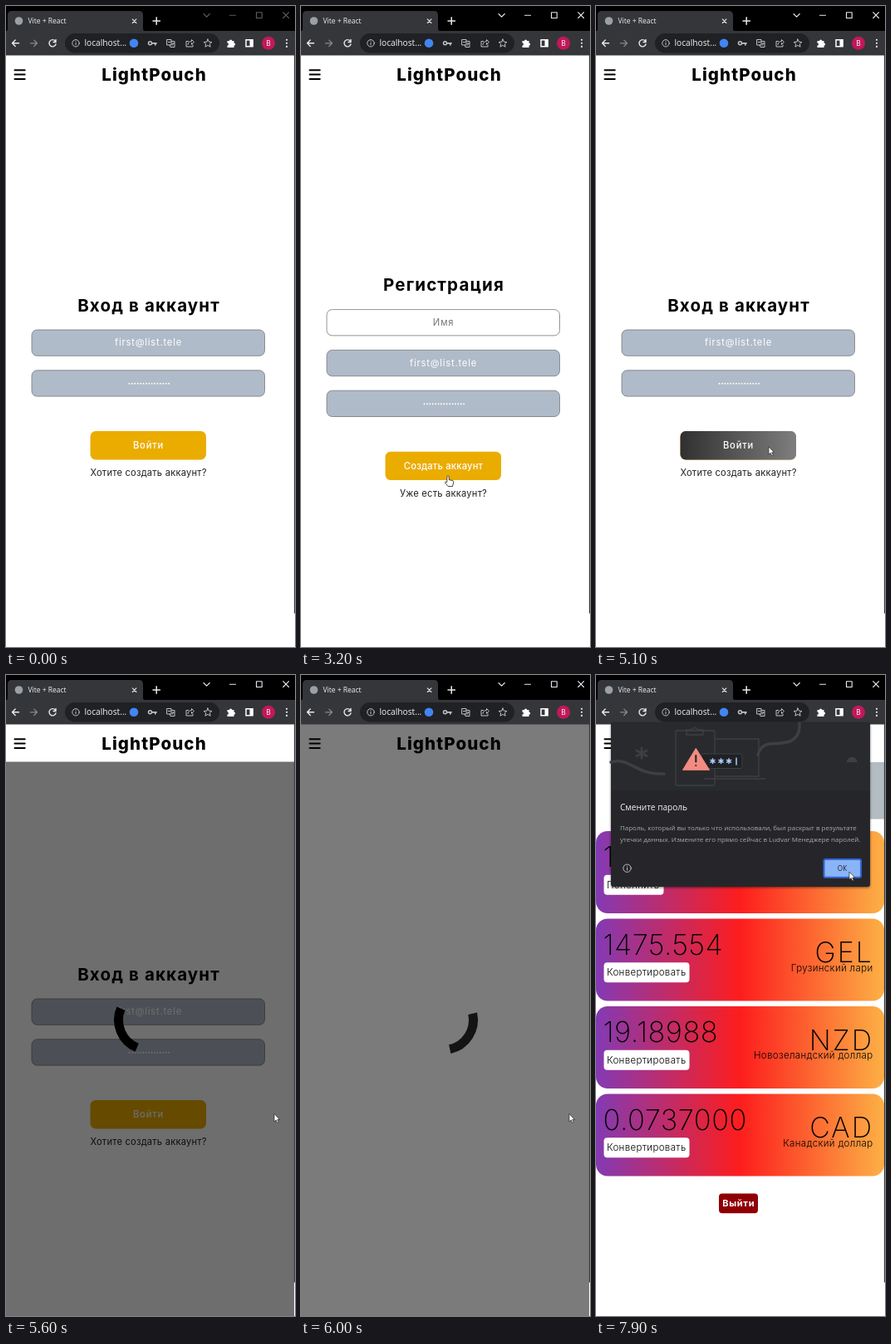
Animation of 348x772 px, one loop 8000 ms. Source, as an HTML page:

```html
<!DOCTYPE html>
<html lang="ru">
<head>
<meta charset="utf-8">
<title>Вход</title>
<style>
html, body { margin: 0; width: 100%; height: 100%; overflow: hidden; background: #fff; }
svg { display: block; width: 348px; height: 772px; }
text { font: 400 11.2px Inter, sans-serif; letter-spacing: .2px; }
.mid { text-anchor: middle; }
.end { text-anchor: end; }
.head { font-size: 20.5px; font-weight: 700; letter-spacing: 1.15px; }
.logo { font-size: 20.5px; font-weight: 800; letter-spacing: 1.1px; }
.btn { font-weight: 500; fill: #fff; }
.sum { font-size: 34.5px; font-weight: 200; letter-spacing: .5px; }
.code { font-size: 34px; font-weight: 200; letter-spacing: 2px; }
.small { font-size: 11.5px; font-weight: 300; letter-spacing: .35px; }
.ui { font-family: "Open Sans", "Noto Sans", sans-serif; letter-spacing: 0; }
.line { fill: none; stroke-linecap: round; stroke-linejoin: round; }
</style>
</head>
<body>
<svg viewBox="0 0 348 772" xmlns="http://www.w3.org/2000/svg">
  <defs>
    <linearGradient id="cardFill">
      <stop offset="0" stop-color="#833ab4"/><stop offset=".5" stop-color="#fd1d1d"/><stop offset="1" stop-color="#fcb045"/>
    </linearGradient>
    <linearGradient id="hoverFill">
      <stop offset="0" stop-color="#303030"/><stop offset="1" stop-color="#7e7e7e"/>
    </linearGradient>
    <filter id="shade" x="-10%" y="-10%" width="120%" height="120%">
      <feDropShadow dx="0" dy="1" stdDeviation="1.500" flood-opacity=".55"/>
    </filter>
  </defs>
  <rect width="348" height="772" fill="#fff"/>

  <g id="login"></g>
  <g id="signup"></g>
  <g id="wallet"></g>

  <g id="veil">
    <rect x="0" y="59" width="347" height="713" id="veilRect"/>
    <path id="arc" class="line" style="stroke-linecap:butt" stroke-width="11" d="M36 0A36 36 0 0 1 0 36"/>
  </g>

  <g id="header">
    <rect id="headerBg" y="59" width="347" height="45.500" fill="#fff"/>
    <path d="M10.500 77.300h12.200M10.500 82.600h12.200M10.500 87.900h12.200" stroke="#000" stroke-width="2" class="line"/>
    <text class="logo mid" x="178.500" y="89.500">LightPouch</text>
  </g>
  <rect x="346.900" y="59" width="1.100" height="672.500" fill="#3c3c3c"/>

  <g id="chrome">
    <rect width="348" height="31" fill="#000"/>
    <path d="M0 31q2-1 2-4V11q0-5 5-5H160q5 0 5 5V27q0 3 3 4z" fill="#35363a"/>
    <rect y="30" width="348" height="29.500" fill="#35363a"/>
    <circle cx="15.500" cy="18" r="4.800" fill="#9aa0a6"/>
    <text class="ui" x="26.500" y="21.200" style="font-size:8.500px" fill="#f1f3f4">Vite + React</text>
    <g class="line" stroke="#e8eaed" stroke-width="1.100">
      <path d="M152.300 15.900l4.600 4.600m0-4.600l-4.600 4.600"/>
      <path d="M177 18h8.400M181.200 13.800v8.400" stroke-width="1.500"/>
      <g id="controls"><path d="M238 9.500l3.600 3.600 3.600-3.600M269.500 11.200h7M301.500 7.800h6.700v6.700h-6.700zM333.700 7.700l6.800 6.800m0-6.800l-6.800 6.800"/></g>
      <path d="M15.500 44.800H7.500m3.700-3.700l-3.700 3.700 3.700 3.700" stroke-width="1.400"/>
      <path d="M29.500 44.800h8m-3.700-3.700l3.700 3.700-3.700 3.700" stroke="#85888c" stroke-width="1.300"/>
      <path d="M59.300 42.200a4.100 4.100 0 1 0 .7 3.800M60 40.500v3h-3" stroke-width="1.400"/>
    </g>
    <rect x="71" y="33" width="186" height="23.500" rx="11.750" fill="#202124"/>
    <g class="line" stroke="#bdc1c6" stroke-width="1">
      <circle cx="84" cy="44.800" r="4.200"/><path d="M84 44.300v2.500M84 42.500v.1"/>
      <circle cx="173.500" cy="44.800" r="2" stroke-width="1.500"/><path d="M175.800 44.800h5.200m-1.200 0v2" stroke-width="1.700"/>
      <path d="M194 40.500h5v6.500h-5zM199 42.500h4v7h-5l-1-2.500M195.300 43.500h2.400M200 45h2M200 47.500l2-2.500"/>
      <path d="M219.500 42.500h-2.500v6.500h8v-2M219 46.500q.5-4 4.500-4v-2l3 3-3 3v-2"/>
      <path d="M243 40l1.400 3.200 3.500.3-2.600 2.300.8 3.400-3.100-1.800-3.100 1.800.8-3.400-2.600-2.300 3.500-.3z"/>
    </g>
    <text class="ui" x="94.500" y="48.400" style="font-size:10.200px" fill="#f1f3f4">localhost...</text>
    <circle cx="154" cy="44.800" r="5.300" fill="#4285f4"/>
    <path d="M266.500 42h2.500a1.600 1.600 0 0 1 3.200 0h2.300v2.500a1.600 1.600 0 0 1 0 3.200V50h-8v-2.500a1.500 1.500 0 0 0 0-3z" fill="#fff"/>
    <path d="M289 40.800h8v8h-8z" fill="none" stroke="#fff" stroke-width="1.500"/><path d="M293.500 40.500h4v8.500h-4z" fill="#fff"/>
    <circle cx="316" cy="44.800" r="8" fill="#c2185b"/>
    <text class="ui mid" x="316" y="47.900" style="font-size:8.500px" fill="#fff">B</text>
    <path class="line" d="M338 40.700v.01M338 44.800v.01M338 48.900v.01" stroke="#fff" stroke-width="2.100"/>
  </g>

  <g id="popup">
    <rect x="18" y="57" width="312" height="198" rx="3" fill="#25262a" filter="url(#shade)"/>
    <rect x="18" y="57" width="312" height="82" fill="#292a2d"/>
    <g class="line" stroke="#3c4043">
      <path d="M18 105C40 98 48 121 82 119M195 96C200 77 215 86 233 80Q246 75 245 58" stroke-width="3.500"/>
      <path d="M55 87.500v13M49 91l12 6.500M61 91l-12 6.500" stroke-width="2.700"/>
      <path d="M143 76V69q0-2-2-2H98q-2 0-2 2v62q0 2 2 2h43q2 0 2-2V77H196v45H143M130 125H204M109 72V66h6q4-5 8 0h6v6z" stroke-width="1.300"/>
    </g>
    <path d="M302 105a6 6 0 0 1 12.500 0z" fill="#3c4043"/>
    <rect x="127" y="95" width="49" height="17.500" rx="2" fill="#202124" stroke="#3c4043"/>
    <g class="line" stroke="#aecbfa" stroke-width="1.500" id="stars"><path d="M169 100v8"/></g>
    <path d="M120.300 88.300L136.500 114.300H104.500z" fill="#f28b82" stroke="#f28b82" stroke-linejoin="round"/>
    <path class="line" d="M120.300 97v7.500M120.300 109v.1" stroke="#202124" stroke-width="2"/>
    <text class="ui" x="29" y="162.500" style="font-size:10.100px" fill="#f1f3f4">Смените пароль</text>
    <g fill="#a6abb0">
      <text class="ui" x="29" y="186.700" style="font-size:7.980px">Пароль, который вы только что использовали, был раскрыт в результате</text>
      <text class="ui" x="29" y="200.700" style="font-size:7.980px">утечки данных. Измените его прямо сейчас в Ludvar Менеджере паролей.</text>
    </g>
    <g class="line" stroke="#bdc1c6" stroke-width="1"><circle cx="37.500" cy="232.700" r="4.700"/><path d="M37.500 232.200v2.800M37.500 230.300v.1"/></g>
    <rect x="274.500" y="222" width="44.500" height="21.800" rx="2" fill="#8ab4f8" stroke="#3367d6" stroke-width="2"/>
    <text class="ui mid" x="296.500" y="235.800" style="font-size:8.200px" fill="#202124">ОК</text>
  </g>

  <path id="arrow" d="M0 0V9.500L2.200 7.500 3.700 11 5.300 10.300 3.800 7H6.600z" fill="#fff" stroke="#222" stroke-width=".7"/>
  <path id="hand" d="M-1.200 1.200Q0-.8 1.200 1.200V5l4.800 1.200Q7 6.800 6.600 8.500L5.500 13H0L-3.500 8.500Q-3.600 6.800-1.200 8z" fill="#fff" stroke="#222" stroke-width=".8"/>
</svg>
<script>
const $ = id => document.getElementById(id);
const LOOP = 8000;

const label = (cls, x, y, str, extra = '') => `<text class="${cls}" x="${x}" y="${y}" ${extra}>${str}</text>`;
const box = (x, y, w, h, r, extra) => `<rect x="${x}" y="${y}" width="${w}" height="${h}" rx="${r}" ${extra}/>`;

function field(y, content, filled = true) {
  return box(31, y, 280.5, 31.3, 6.5, `fill="${filled ? '#b0bbc9' : '#fff'}" stroke="#77787c" stroke-width=".8"`) + content;
}
const email = y => field(y, label('mid', 171.5, y + 19.4, 'first@list.tele', 'fill="#fff" style="letter-spacing:.8px"'));
const password = y => field(y, `<path class="line" d="M148.500 ${y + 16}h47.700" stroke="#fff" stroke-width="1.900" stroke-dasharray="0 3.400"/>`);

function form(title, shift, fields, action, spacing, link) {
  const y = 512 + shift;
  return label('head mid', 172, 367.5 - shift, title) + fields +
    box(101.5, y, 139.5, 34.4, 6.5, 'fill="#ebac00"') +
    box(101.5, y, 139.5, 34.4, 6.5, 'class="hover" fill="url(#hoverFill)" opacity="0"') +
    label('btn mid', 171.5, y + 21.3, action, `style="letter-spacing:${spacing}px"`) +
    label('mid', 171.5, y + 54, link, 'fill="#222"');
}

$('login').innerHTML = form('Вход в аккаунт', 0, email(390) + password(438.8),
  'Войти', 0.8, 'Хотите создать аккаунт?');
$('signup').innerHTML = form('Регистрация', 24.7,
  field(365.6, label('mid', 171.5, 385, 'Имя', 'fill="#777" style="letter-spacing:.8px"'), false) + email(414.4) + password(463.2),
  'Создать аккаунт', 0.2, 'Уже есть аккаунт?');

const cards = [
  ['1', '', '', 'Пополнить', 72],
  ['1475.554', 'GEL', 'Грузинский лари', 'Конвертировать', 103],
  ['19.18988', 'NZD', 'Новозеландский доллар', 'Конвертировать', 103],
  ['0.0737000', 'CAD', 'Канадский доллар', 'Конвертировать', 103]
];
$('wallet').innerHTML = box(40, 105, 307, 68.5, 0, 'fill="#b3bcc3"') +
  cards.map(([sum, code, name, action, w], i) => {
    const y = 188 + i * 105.5;
    return box(0, y, 347, 99, 14, 'fill="url(#cardFill)"') +
      label('sum', 8.5, y + 43.3, sum) + label('code end', 334, y + 52.5, code) +
      label('small end', 333.5, y + 63.3, name) +
      box(9.5, y + 52.8, w, 24, 4, 'fill="#fff"') + label('small', 13, y + 68.6, action);
  }).join('') +
  box(148, 624.5, 47, 23.8, 4, 'fill="#8f0006"') +
  label('mid', 171.8, 640.3, 'Выйти', 'fill="#fff" style="font-weight:700;font-size:11px;letter-spacing:.7px"');

$('stars').innerHTML += [140.5, 150.5, 160].map(x =>
  `<path d="M${x} 100.800v5.800M${x - 2.5} 102.300l5 2.800M${x + 2.5} 102.300l-5 2.800"/>`).join('');

// Cursor stops: time, x, y
const path = [
  [1900, 215, 608], [2500, 177, 565.5], [3450, 177, 565.5], [3800, 164, 588.5],
  [4250, 164, 588.5], [4800, 191, 531], [5000, 191, 531],
  [5450, 323, 528.5], [6850, 323, 528.5], [7600, 305, 240], [7800, 305, 237]
];
const ease = k => k * k * (3 - 2 * k);
const ramp = (t, a, b) => Math.min(1, Math.max(0, (t - a) / (b - a)));

function cursorAt(t) {
  const i = path.findIndex(p => p[0] > t);
  if (i < 1) return path[i < 0 ? path.length - 1 : 0].slice(1);
  const [a, x, y] = path[i - 1], [b, u, v] = path[i];
  const k = ease((t - a) / (b - a));
  return [x + (u - x) * k, y + (v - y) * k];
}

const show = (id, on) => $(id).setAttribute('display', on ? 'inline' : 'none');
const loginHover = document.querySelector('#login .hover');

function draw(t) {
  const signup = t >= 3000 && t < 4200;
  const leaving = t >= 5900;
  show('signup', signup);
  show('login', !signup && !leaving);
  show('wallet', t >= 7000);
  show('popup', t >= 6200);

  show('veil', t >= 5200 && t < 6200);
  $('veilRect').setAttribute('fill', leaving ? '#7b7b7b' : 'rgba(0,0,0,.57)');
  $('arc').setAttribute('stroke', leaving ? '#141414' : '#000');
  $('arc').setAttribute('transform', `translate(171.5 415.5) rotate(${112 + (t - 5600) * 0.5875})`);
  show('headerBg', !(leaving && t < 6200));

  $('controls').setAttribute('opacity', t < 2300 ? 0.4 : 1);
  loginHover.setAttribute('opacity', ramp(t, 4550, 4800) * (1 - ramp(t, 5150, 5400)));

  const [x, y] = cursorAt(t);
  const pointing = t >= 2400 && t < 4300;
  show('hand', pointing);
  show('arrow', t >= 1900 && !pointing);
  for (const id of ['hand', 'arrow']) $(id).setAttribute('transform', `translate(${x} ${y})`);
}

const start = performance.now();
function tick() {
  draw((performance.now() - start) % LOOP);
  requestAnimationFrame(tick);
}
tick();
</script>
</body>
</html>
```
